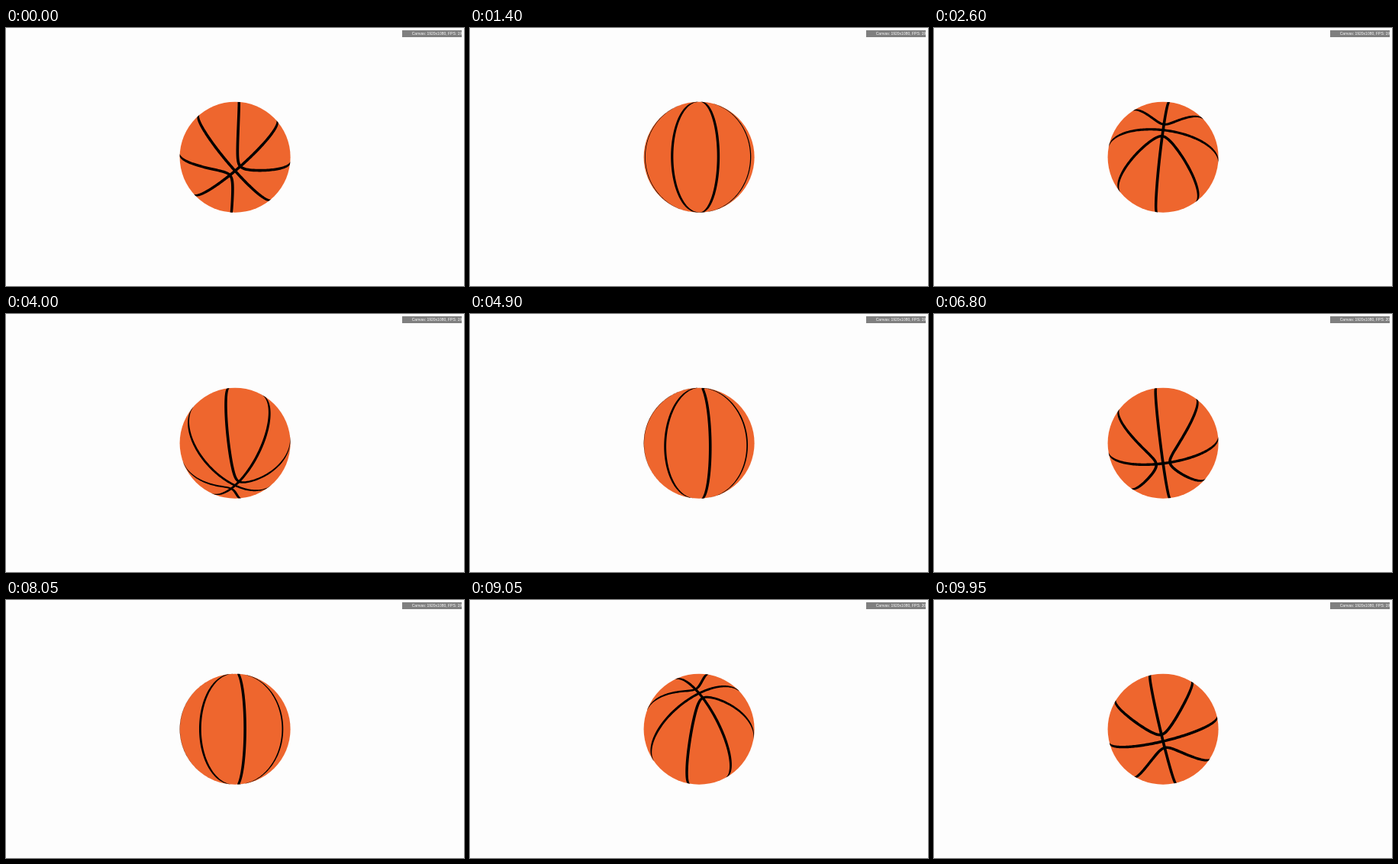
Write an HTML page with a canvas that moves like this. It is 600 by 338 pixels and loops after 10000 ms.

```html
<!DOCTYPE html>
<html lang="en">
<head>
<meta charset="utf-8">
<title>Spinning basketball</title>
<style>
  html, body { margin: 0; width: 600px; height: 338px; overflow: hidden; background: #fdfdfd; }
  canvas { display: block; }
  #stats {
    position: absolute; left: 518.75px; top: 3px; width: 78.2px; height: 9.4px;
    box-sizing: border-box; padding-left: 13px; overflow: hidden; white-space: nowrap;
    background: #7f7f7f; color: #fff; font: 5px/8.6px "Liberation Sans", Arial, sans-serif;
  }
</style>
</head>
<body>
<canvas id="stage" width="600" height="338"></canvas>
<div id="stats"></div>
<script>
const ctx = document.getElementById('stage').getContext('2d');
const stats = document.getElementById('stats');
const LOOP = 10000, CX = 300.1, CY = 169.2, RADIUS = 72.5;
const CAMERA = 10;                        // camera distance in ball radii
const HORIZON = 1 / CAMERA;
const LIMB = Math.sqrt(1 - HORIZON ** 2);
const HALF_WIDTH = 0.023, STEPS = 240, BEND = 0.114;
const TILT_0 = 103 * Math.PI / 180, SPIN_0 = 131 * Math.PI / 180;

// Rotation ticks reached at each time; the tick rate varies slightly.
const TICKS = [[0, 0], [1400, 26.6], [2600, 49], [4000, 74.2], [5700, 106.4], [8050, 152.4], [10000, 188.9]];

const unit = p => { const l = Math.hypot(...p); return p.map(c => c / l); };
const cross = (a, b) => [
  a[1] * b[2] - a[2] * b[1], a[2] * b[0] - a[0] * b[2], a[0] * b[1] - a[1] * b[0]];

// Seams as closed curves: x across, y towards the pole, z along the main seam.
const loop = side => s => {
  const v = Math.sin(s), w = Math.cos(s);
  return unit([v, w, side * Math.hypot(v, BEND * w)]);
};
const seams = [
  s => [0, Math.cos(s), Math.sin(s)],
  s => [Math.sin(s), Math.cos(s), 0],
  loop(1), loop(-1)
].map(curve => Array.from({ length: STEPS + 1 }, (_, i) => {
  const s = i / STEPS * 2 * Math.PI, p = curve(s), q = curve(s + 0.001);
  const n = unit(cross(p, q));
  return [1, -1].map(k => unit(p.map((c, j) => c + k * HALF_WIDTH * n[j])));
}));

function ticksAt(t) {
  const i = TICKS.findIndex(k => k[0] > t);
  const [t0, n0] = TICKS[i - 1], [t1, n1] = TICKS[i];
  return n0 + (n1 - n0) * (t - t0) / (t1 - t0);
}

function projector(tilt, spin) {
  const ct = Math.cos(tilt), st = Math.sin(tilt), cs = Math.cos(spin), ss = Math.sin(spin);
  return ([x0, y0, z0]) => {
    const x = x0 * cs + z0 * ss, z1 = z0 * cs - x0 * ss;
    const y = y0 * ct - z1 * st, z = y0 * st + z1 * ct;
    const scale = RADIUS * LIMB / (1 - z * HORIZON);
    return { x: CX + x * scale, y: CY - y * scale, front: z > HORIZON };
  };
}

function drawBall(n) {
  const project = projector(TILT_0 + 0.05 * n, SPIN_0 + 0.02 * n);
  ctx.fillStyle = '#fdfdfd';
  ctx.fillRect(0, 0, 600, 338);
  ctx.fillStyle = '#ee662e';
  ctx.beginPath();
  ctx.arc(CX, CY, RADIUS, 0, 2 * Math.PI);
  ctx.fill();
  ctx.fillStyle = '#000';
  for (const seam of seams) {
    const edge = seam.map(pair => pair.map(project));
    ctx.beginPath();
    for (let i = 0; i < STEPS; i++) {
      const quad = [edge[i][0], edge[i + 1][0], edge[i + 1][1], edge[i][1]];
      if (!quad.some(p => p.front)) continue;
      quad.forEach((p, j) => j ? ctx.lineTo(p.x, p.y) : ctx.moveTo(p.x, p.y));
      ctx.closePath();
    }
    ctx.fill();
  }
}

function draw(now) {
  const t = Math.floor(now % LOOP / 50) * 50;
  const fast = (t >= 5500 && t < 7600) || (t >= 8600 && t < 9600);
  drawBall(ticksAt(t));
  stats.textContent = `Canvas: 1920x1080, FPS: ${fast ? 20 : 19}`;
  requestAnimationFrame(() => draw(performance.now()));
}
draw(performance.now());
</script>
</body>
</html>
```
